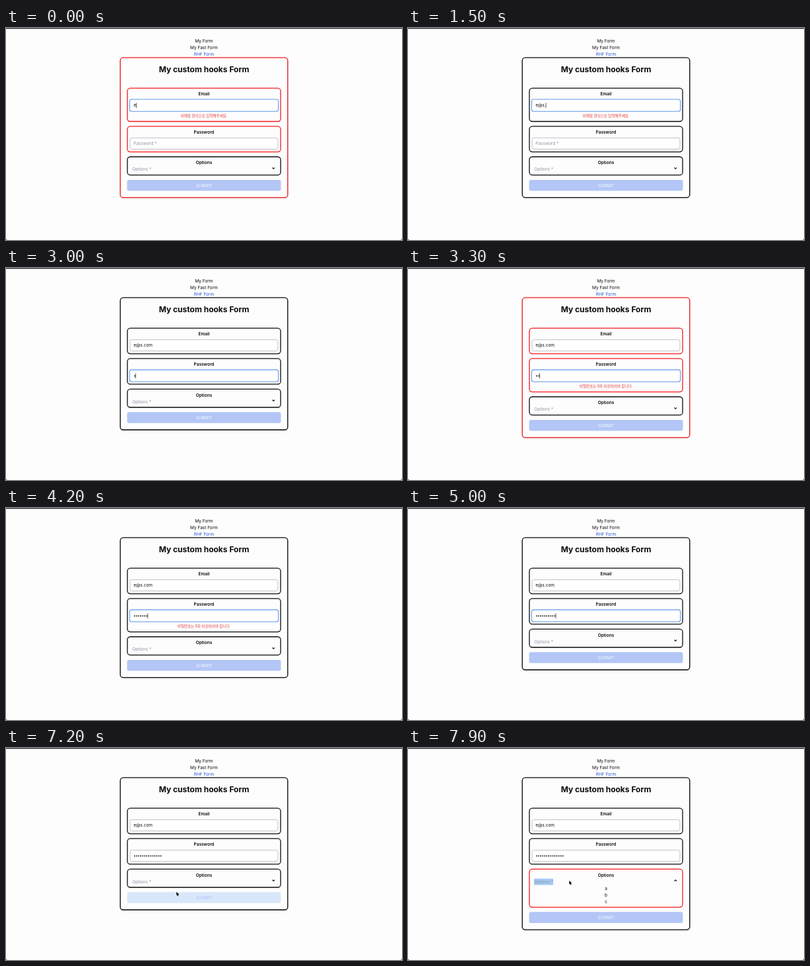
An HTML page that plays this animation: 600 by 321 pixels, repeating every 8 s.

```html
<!DOCTYPE html>
<html lang="en">
<head>
<meta charset="utf-8">
<title>Form demo</title>
<style>
  html, body { margin: 0; width: 100%; height: 100%; overflow: hidden; background: #fdfdfd; }
  svg { display: block; width: 100%; height: 100%; }
  text { font: 6.5px Inter, sans-serif; white-space: pre; }
  .label { font-weight: 600; }
  .title { font-size: 12px; font-weight: 700; }
  .error { font: 5.6px "Noto Sans CJK KR", "Noto Sans CJK JP", sans-serif; }
  .card { filter: drop-shadow(0 1px 1px rgba(0, 0, 0, .16)); }
</style>
</head>
<body>
<svg id="stage" viewBox="0 0 600 321"></svg>
<script>
const LOOP = 8000;
const EMAIL = "e@s.com";
const RED = "#f5191c", BLACK = "#0b0b0d", GRAY = "#8b94a5";

// Times at which each further character appears
const EMAIL_KEYS = [0, 1000, 1300, 1500, 1700, 1800, 2000];
const PASSWORD_KEYS = [3000, 3300, 3500, 3700, 3900, 4100, 4200, 4500, 4600, 5000, 5100, 5400, 5400, 5500];
// Each re-render outlines the form in red for half a second
const RENDERS = [0, 1700, 3300, 4500];
const MOUSE = [[6800, 292, 249], [7200, 258.3, 217.8], [7600, 244.3, 200.8]];

const stage = document.getElementById("stage");
const pen = document.createElement("canvas").getContext("2d");
pen.font = "65px Inter, sans-serif";
const textWidth = s => pen.measureText(s).width / 10;

const typed = (keys, t) => keys.filter(k => k <= t).length;
const between = (t, from, to) => t >= from && t < to;

// Text is placed by its vertical centre
function text(s, x, y, { fill = BLACK, cls = "", anchor = "middle", rise = 2.35 } = {}) {
  return `<text x="${x}" y="${y + rise}" fill="${fill}" class="${cls}" text-anchor="${anchor}">${s}</text>`;
}

function box(x, y, w, h, r, stroke, weight = 1.3, fill = "none", cls = "") {
  return `<rect x="${x}" y="${y}" width="${w}" height="${h}" rx="${r}" fill="${fill}"
    stroke="${stroke}" stroke-width="${weight}" class="${cls}"/>`;
}

function group(y, h, label, color) {
  return box(183.9, y, 232.2, h, 4.5, color) + text(label, 300, y + 8.9, { cls: "label" });
}

function input(y, focused, content, caretX) {
  const frame = focused
    ? box(187.3, y + 16.9, 225.4, 18.2, 3, "#5f97ec", 1.1, "#fff")
    : box(188, y + 17.5, 224, 17, 2.8, "#b9bbbf", .9, "#fff");
  const caret = focused ? `<path d="M${caretX} ${y + 22.3}v7.6" stroke="#111" stroke-width=".7"/>` : "";
  return frame + content + caret;
}

function field(y, label, { color, focused, content, caretX, error }) {
  return group(y, error ? 50.4 : 38.7, label, color)
    + input(y, focused, content, caretX)
    + (error ? text(error, 300, y + 42, { fill: "#e5383a", cls: "error", rise: 2.1 }) : "");
}

function mouseAt(t) {
  if (t < MOUSE[0][0]) return null;
  const i = MOUSE.findIndex(m => m[0] > t);
  if (i < 0) return MOUSE.at(-1).slice(1);
  const [a, b] = [MOUSE[i - 1], MOUSE[i]];
  const k = (t - a[0]) / (b[0] - a[0]);
  return [1, 2].map(n => a[n] + (b[n] - a[n]) * k);
}

function passwordDots(count, y) {
  return Array.from({ length: count }, (_, i) =>
    `<circle cx="${194.9 + 3.06 * i}" cy="${y}" r=".95" fill="${BLACK}"/>`).join("");
}

function optionsGroup(y, open) {
  const chevron = open ? "l1.8-1.8 1.8 1.8" : "l1.8 1.8 1.8-1.8";
  const selection = open ? `<rect x="191" y="${y + 14.4}" width="29" height="9.8" fill="#a5cbf5"/>` : "";
  const choices = open
    ? ["a", "b", "c"].map((s, i) => text(s, 300, y + 29 + 10 * i)).join("") : "";
  return group(y, open ? 57.8 : 27.7, "Options", open ? RED : BLACK)
    + selection
    + text("Options *", 191.2, y + 18.9, { fill: GRAY, anchor: "start" })
    + `<path d="M403.5 ${y + (open ? 18.3 : 16.4)}${chevron}" fill="none" stroke="${BLACK}" stroke-width="1.1"/>`
    + choices;
}

function draw(t) {
  const color = RENDERS.some(r => between(t, r, r + 500)) ? RED : BLACK;
  const emailError = t < 1700;
  const passwordError = between(t, 3300, 4500);
  const open = t >= 7700;
  const email = EMAIL.slice(0, typed(EMAIL_KEYS, t));
  const dots = typed(PASSWORD_KEYS, t);
  const mouse = mouseAt(t);

  const emailY = 91.1;
  const passwordY = emailY + (emailError ? 57.8 : 46.1);
  const optionsY = passwordY + (passwordError ? 57.8 : 46.1);
  const submitY = optionsY + (open ? 65 : 34.9);
  const hover = mouse && between(mouse[1], submitY - .6, submitY + 16.5);

  const links = ["My Form", "My Fast Form", "RHF Form"].map((s, i) =>
    text(s, 300, 19.5 + 10.05 * i, { fill: i === 2 ? "#2457dd" : BLACK })).join("");

  const emailField = field(emailY, "Email", {
    color,
    focused: t < 2600,
    content: text(email, 193.3, emailY + 26, { anchor: "start" }),
    caretX: 193.6 + textWidth(email),
    error: emailError && "이메일 형식으로 입력해주세요."
  });

  const passwordField = field(passwordY, "Password", {
    color,
    focused: between(t, 2600, 6000),
    content: dots ? passwordDots(dots, passwordY + 26.2)
      : text("Password *", 193.3, passwordY + 26, { fill: GRAY, anchor: "start" }),
    caretX: 193.4 + 3.06 * dots,
    error: passwordError && "비밀번호는 8자 이상이어야 합니다."
  });

  const submit = `<rect x="183.5" y="${submitY}" width="233" height="16.6" rx="2.5"
      fill="${hover ? "#d8e8fa" : "#b3c6f6"}"/>`
    + text("SUBMIT", 300, submitY + 8.4, { fill: hover ? "#b1c7f8" : "#f4f7ff" });

  const pointer = mouse
    ? `<path transform="translate(${mouse})" d="M0 0v5.8l1.3-1.2.9 2 1.1-.5-.9-1.9h1.8z"
        fill="#000" stroke="#fff" stroke-width=".5" paint-order="stroke"/>` : "";

  return `<rect width="600" height="321" fill="#fdfdfd"/>
    <path d="M0 0h600v.9h-600zM0 321v-2q0 2 2 2zM600 321v-2q0 2-2 2z" fill="#000"/>`
    + links
    + box(173.2, 44.8, 253.6, submitY + 26.8 - 44.8, 4.5, color, 1.3, "#fdfdfd", "card")
    + text("My custom hooks Form", 300, 63, { cls: "title", rise: 4.4 })
    + emailField + passwordField + optionsGroup(optionsY, open) + submit + pointer;
}

let shown = "";
function tick() {
  // The pointer and keys advance in tenths of a second
  const t = Math.floor(performance.now() % LOOP / 100) * 100;
  const picture = draw(t);
  if (picture !== shown) stage.innerHTML = shown = picture;
  requestAnimationFrame(tick);
}
tick();
</script>
</body>
</html>
```
